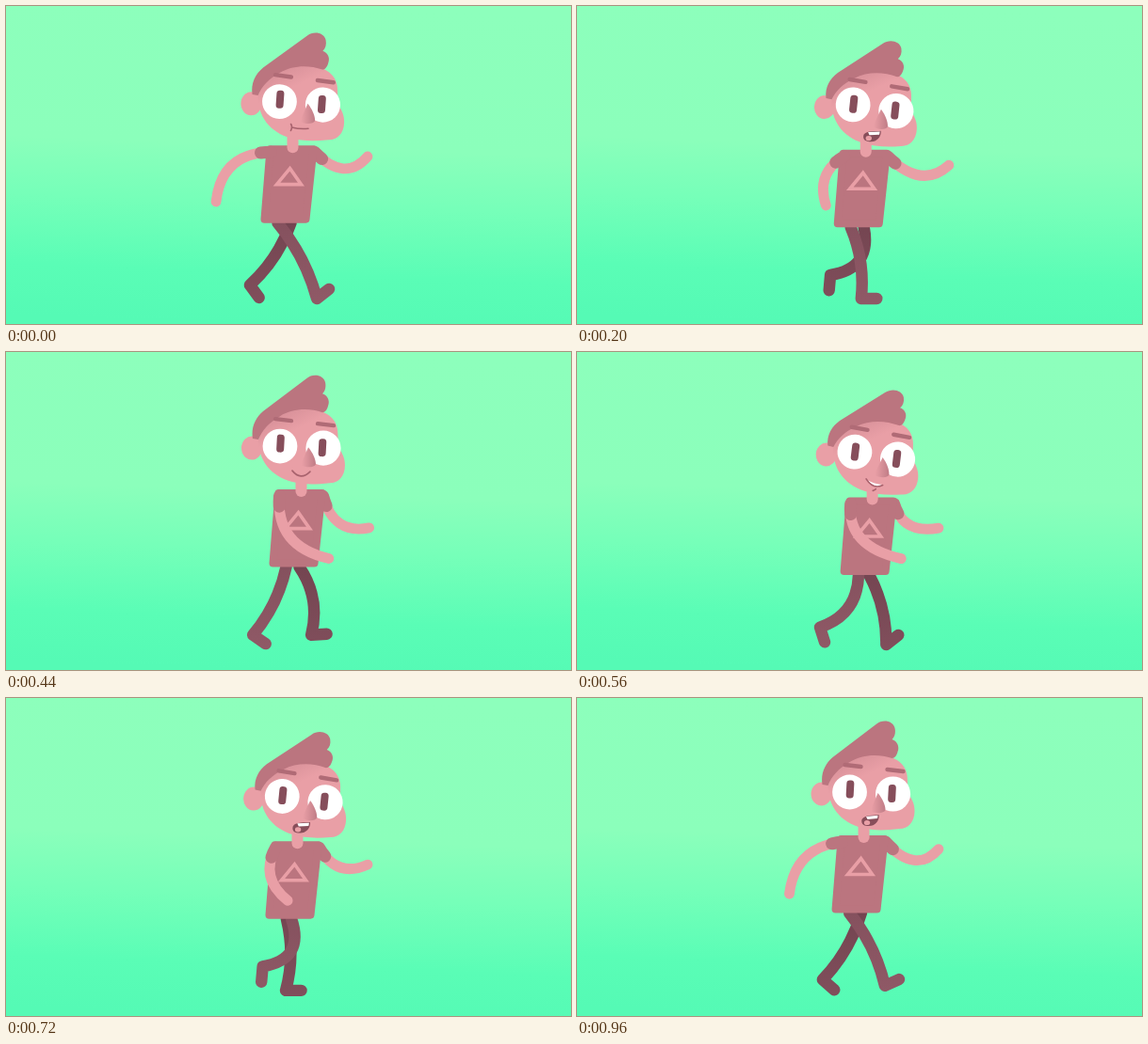
Write an HTML page that moves like this. It is 600 px wide and 338 px high and loops after 1 s.

```html
<!DOCTYPE html>
<html lang="en">
<head>
<meta charset="utf-8">
<title>Walk cycle</title>
<style>
html, body { margin: 0; width: 100%; height: 100%; overflow: hidden; background: #8dffbb; }
svg { display: block; width: 100%; height: 100%; }
.limb { fill: none; stroke-width: 12.4; stroke-linecap: round; stroke-linejoin: round; }
.skin { stroke: #e99fa6; stroke-width: 10.8; }
.sleeve { fill: none; stroke: #bb757f; stroke-width: 13; stroke-linecap: round; stroke-dasharray: 11 400; }
.cloth { fill: #bb757f; }
.line { fill: none; stroke: #a8626d; stroke-width: 1.6; stroke-linecap: round; }
.brow { fill: none; stroke: #b06b76; stroke-width: 4.4; stroke-linecap: round; }
</style>
</head>
<body>
<svg viewBox="0 0 600 338" preserveAspectRatio="none">
  <defs>
    <linearGradient id="sky" gradientUnits="userSpaceOnUse" x1="303" y1="0" x2="290" y2="338">
      <stop offset="0" stop-color="#8dffbc"/>
      <stop offset=".44" stop-color="#8bffbb"/>
      <stop offset=".62" stop-color="#76ffb9"/>
      <stop offset=".84" stop-color="#5afdb6"/>
      <stop offset="1" stop-color="#55fab5"/>
    </linearGradient>
    <linearGradient id="near" gradientUnits="userSpaceOnUse" x1="0" y1="230" x2="0" y2="312">
      <stop offset="0" stop-color="#85515e"/>
      <stop offset="1" stop-color="#8f5966"/>
    </linearGradient>
    <linearGradient id="far" gradientUnits="userSpaceOnUse" x1="0" y1="230" x2="0" y2="312">
      <stop offset="0" stop-color="#744551"/>
      <stop offset="1" stop-color="#804e5b"/>
    </linearGradient>
    <linearGradient id="face" gradientUnits="userSpaceOnUse" x1="286" y1="60" x2="300" y2="88">
      <stop offset="0" stop-color="#d28c95"/>
      <stop offset="1" stop-color="#e99fa6"/>
    </linearGradient>
    <linearGradient id="nose" gradientUnits="userSpaceOnUse" x1="313" y1="0" x2="328" y2="0">
      <stop offset="0" stop-color="#e99fa6"/>
      <stop offset="1" stop-color="#c07c86"/>
    </linearGradient>
  </defs>
  <rect width="600" height="338" fill="url(#sky)"/>
  <path id="farLeg" class="limb" stroke="url(#far)"/>
  <path id="nearLeg" class="limb" stroke="url(#near)"/>
  <path id="farArm" class="limb skin"/>
  <path id="farSleeve" class="sleeve"/>
  <path id="shirt" class="cloth" stroke="#bb757f" stroke-width="8" stroke-linejoin="round"/>
  <path id="badge" fill="none" stroke="#e99fa6" stroke-width="3.6"/>
  <path id="nearArm" class="limb skin"/>
  <path id="nearSleeve" class="sleeve"/>
  <path id="neck" class="limb skin" style="stroke-width:12"/>
  <g id="head">
    <ellipse cx="260" cy="104" rx="11" ry="12.5" fill="#e99fa6"/>
    <path fill="url(#face)" d="M267 95C272 75 290 62 314 62C336 62 349 70 351 84C352 92 351 98 353 104C356 110 359 114 359 122C359 134 352 141 343 141C328 143 314 143 303 140C280 134 267 117 267 95Z"/>
    <path id="hair" class="cloth" d="M261 94C259 82 264 72 272 65L318 30C325 24 336 26 338 34C339 39 338 43 335 46C341 48 343 54 341 59C340 63 338 66 335 66C320 61 303 62 290 70C278 77 271 85 267 95Z"/>
    <path class="brow" d="M285 73L302 75M330 78L347 80"/>
    <circle id="eye" cx="290" cy="102" r="18.4" fill="#fff"/>
    <circle cx="336" cy="104" r="18.6" fill="#fff"/>
    <g fill="#864e5b">
      <rect x="286.5" y="89.5" width="8" height="19" rx="3.5" transform="rotate(3 290 99)"/>
      <rect x="331" y="94" width="8" height="19" rx="3.5" transform="rotate(3 335 103)"/>
    </g>
    <path fill="url(#nose)" d="M320 103C325 109 328 116 328 121C326 125 318 125 312 122Z"/>
    <path class="line mouth" d="M302.5 125Q304.5 128 302.5 132M303.5 128.5Q312 130.5 321 129.5"/>
    <g class="mouth">
      <path fill="#884e5a" d="M303 131C306 126 316 127 321 126C322 133 316 139 309 138C304 138 302 135 303 131Z"/>
      <path fill="#fff" d="M307.5 128L320 126.8L319.5 130L309 131Z"/>
      <ellipse cx="308.5" cy="134.5" rx="3.2" ry="2.6" fill="#e99fa6"/>
    </g>
    <path class="line mouth" d="M303 128Q312 139 322 129"/>
    <g class="mouth">
      <path fill="#fff" d="M305 128Q313 132 322 132Q317 139 305 128Z"/>
      <path class="line" d="M304 127Q312 138 322 132.5M312 139Q314 138.5 315 137"/>
    </g>
  </g>
</svg>
<script>
const $ = id => document.getElementById(id);
const set = (id, d) => $(id).setAttribute('d', d);
const move = (id, transform) => $(id).setAttribute('transform', transform);
const LOOP = 1000, STEP = 40, TURN = 2 * Math.PI / LOOP;

const smooth = (from, to, x) => {
  const u = Math.min(1, Math.max(0, (x - from) / (to - from)));
  return u * u * (3 - 2 * u);
};
const mix = (a, b, u) => a + (b - a) * u;
const lobe = s => Math.max(0, s) ** 2;

// 0 = body high, 1 = body low; a quick drop and a slow rise on every step.
function dip(t) {
  const u = (t / (LOOP / 2) + 0.07) % 1;
  return u < 0.22 ? smooth(0, 0.22, u) : 1 - smooth(0.22, 1, u);
}

function drawArm(name, x, y, cx, cy, hx, hy) {
  const d = `M${x} ${y}Q${cx} ${cy} ${hx} ${hy}`;
  set(name + 'Arm', d);
  set(name + 'Sleeve', d);
}

// The heel lands at t = 0, the foot peels off, swings through and lands again.
function drawLeg(id, t, x, y) {
  const ax = 289.5 + 36 * Math.cos(TURN * (t - 25)) + 5 * Math.cos(2 * TURN * t);
  const ay = 311 - 26 * (smooth(200, 760, t) - smooth(860, 1000, t));
  const turn = -38 + 38 * smooth(60, 180, t) + 95 * smooth(260, 700, t)
    - 95 * smooth(840, 990, t) - 38 * smooth(840, 990, t);
  const foot = turn * Math.PI / 180, size = 16.5;

  // The knee bows forward as the hip and the ankle come closer.
  const dx = ax - x, dy = ay - y, dist = Math.hypot(dx, dy);
  const bow = 0.7 * Math.sqrt(Math.max(200, 77 ** 2 - dist ** 2)) / dist;
  const cx = x + dx / 2 + dy * bow, cy = y + dy / 2 - dx * bow;
  set(id, `M${x} ${y}Q${cx} ${cy} ${ax} ${ay}l${size * Math.cos(foot)} ${size * Math.sin(foot)}`);
}

const mouths = document.querySelectorAll('.mouth');
const mouthAt = t => t < 120 ? 0 : t < 360 ? 1 : t < 520 ? 2 : t < 640 ? 3 : 1;

function draw(t) {
  const wave = Math.sin(TURN * t);
  const swing = (1 + Math.cos(TURN * (t - 505))) / 2;
  const low = dip(t);

  const x = 303.5 + 9.5 * swing ** 1.3, y = 146 + 9 * low;
  const hemX = x - 7, hemY = y + 82.5;
  set('shirt', `M${x - 23} ${y + 4}H${x + 23}L${hemX + 22} ${hemY - 4}H${hemX - 22}Z`);
  set('badge', `M${x - 2} ${y + 24.5}L${x + 10} ${y + 41.5}H${x - 16}Z`);
  set('neck', `M${x + 1} ${y - 14}V${y + 2}`);

  const bend = swing ** 0.8, reach = 12 * lobe(wave);
  drawArm('near', x - 22, y + 7,
    mix(229, 288, bend), mix(156, 208, bend), mix(223, 348, swing), mix(208, 220, swing));
  drawArm('far', x + 24, y + 7,
    360 - 14 * swing + reach, 188 + 6 * swing + reach / 2, 384 + reach, mix(160, 188, swing));

  const hip = 7 - 10 * lobe(-wave);
  drawLeg('nearLeg', t, hemX - hip - 1, hemY);
  drawLeg('farLeg', (t + LOOP / 2) % LOOP, hemX + hip - 1, hemY);

  const ex = 289.5 + 4 * low + 1.5 * swing, ey = 100 + 9.5 * low;
  move('head', `translate(${ex} ${ey}) rotate(${4 * low}) translate(-290 -102)`);
  move('hair', `translate(0 102) scale(1 ${1 - 0.06 * low}) translate(0 -102)`);
  move('eye', `translate(0 ${-3 * low})`);

  const shown = mouthAt(t);
  mouths.forEach((m, i) => { m.style.display = i === shown ? '' : 'none'; });
}

const start = performance.now();
function tick() {
  const t = (performance.now() - start) % LOOP;
  draw(Math.floor(t / STEP) * STEP);
  requestAnimationFrame(tick);
}
draw(0);
requestAnimationFrame(tick);
</script>
</body>
</html>
```
